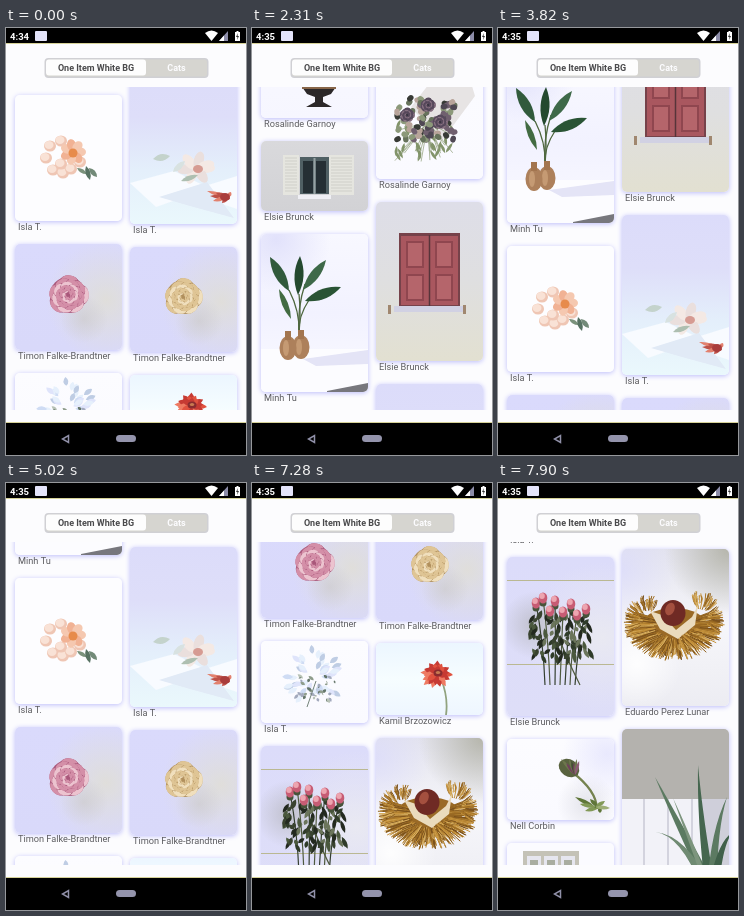
Animation of 240 by 427 pixels, one loop 8000 ms. Source, as an HTML page with a canvas:

```html
<!DOCTYPE html>
<html lang="en">
<head>
<meta charset="utf-8">
<title>Photo list</title>
<style>
  html, body { margin: 0; width: 100%; height: 100%; overflow: hidden; background: #fcfcfe; }
  canvas { display: block; width: 240px; height: 427px; }
</style>
</head>
<body>
<canvas id="stage" width="240" height="427"></canvas>
<script>
const LOOP = 8000, STRIP_TOP = -420, VIEW_TOP = 59, VIEW_H = 323, CARD_W = 107;
const PAGE = '#fcfcfe', LAVENDER = '#dcdcfa';
const stage = document.getElementById('stage').getContext('2d');

const stripCanvas = document.createElement('canvas');
stripCanvas.width = 240;
stripCanvas.height = 1260;
const g = stripCanvas.getContext('2d');

let seed = 7;
const random = () => (seed = (seed * 16807) % 2147483647) / 2147483647;
const spread = (mid, range) => mid + (random() - 0.5) * range;
const pick = list => list[Math.floor(random() * list.length)];

// Drawing helpers, in coordinates local to a card

function rect(x, y, w, h, color) {
  g.fillStyle = color;
  g.fillRect(x, y, w, h);
}

function oval(x, y, rx, ry, color, angle = 0) {
  g.fillStyle = color;
  g.beginPath();
  g.ellipse(x, y, rx, ry, angle, 0, 7);
  g.fill();
}

function poly(color, ...points) {
  g.fillStyle = color;
  g.beginPath();
  for (let i = 0; i < points.length; i += 2) g.lineTo(points[i], points[i + 1]);
  g.fill();
}

function line(x1, y1, x2, y2, color, width = 1, bend = 0) {
  g.strokeStyle = color;
  g.lineWidth = width;
  g.beginPath();
  g.moveTo(x1, y1);
  g.quadraticCurveTo((x1 + x2) / 2 + bend, (y1 + y2) / 2, x2, y2);
  g.stroke();
}

function leaf(x1, y1, x2, y2, width, color) {
  const length = Math.hypot(x2 - x1, y2 - y1);
  const nx = (y1 - y2) / length * width, ny = (x2 - x1) / length * width;
  const mx = (x1 + x2) / 2, my = (y1 + y2) / 2;
  g.fillStyle = color;
  g.beginPath();
  g.moveTo(x1, y1);
  g.quadraticCurveTo(mx + nx, my + ny, x2, y2);
  g.quadraticCurveTo(mx - nx, my - ny, x1, y1);
  g.fill();
}

function gradient(h, ...colors) {
  const fill = g.createLinearGradient(0, 0, 0, h);
  colors.forEach((color, i) => fill.addColorStop(i / (colors.length - 1), color));
  rect(0, 0, CARD_W, h, fill);
}

function glow(x, y, r, rgb, alpha) {
  const fill = g.createRadialGradient(x, y, 0, x, y, r);
  fill.addColorStop(0, `rgba(${rgb},${alpha})`);
  fill.addColorStop(1, `rgba(${rgb},0)`);
  rect(x - r, y - r, r * 2, r * 2, fill);
}

function rose(x, y, r, [shade, petal, light]) {
  const count = 36;
  oval(x, y, r * 0.9, r * 0.9, shade);
  for (let i = 0; i < count; i++) {
    const a = i * 2.4, reach = r * (1 - i / count), size = r * 0.12 + reach * 0.3;
    const px = x + Math.cos(a) * reach * 0.72, py = y + Math.sin(a) * reach * 0.72;
    oval(px, py, size * 0.75, size * 1.15, shade, a);
    oval(px + Math.cos(a), py + Math.sin(a), size * 0.65, size, i % 3 ? petal : light, a);
  }
  oval(x, y, r * 0.1, r * 0.1, shade);
}

// Pictures

function urn() {
  gradient(160, '#fcfcff', '#f6f6ff');
  for (let i = 0; i < 60; i++) {
    oval(spread(58, 64), spread(99, 42), 4, 3,
      pick(['#495647', '#71806a', '#d9c3cb', '#f0dfe0', '#9c6f86']), random() * 3);
  }
  poly('#2c2829', 39, 126, 77, 126, 70, 136, 62, 139, 62, 144, 71, 149, 45, 149, 54, 144, 54, 139, 46, 136);
  line(41, 130, 75, 130, '#886649', 2);
}

function windowFacade() {
  gradient(70, '#d9d9dc', '#d2d2d5');
  for (const [x, w] of [[22, 16], [68, 25]]) {
    rect(x, 14, w, 40, '#e5e5df');
    for (let y = 17; y < 53; y += 3) line(x + 2, y, x + w - 2, y, '#c6c6c0', 0.7);
  }
  rect(39, 16, 29, 37, '#506064');
  rect(42, 20, 10, 32, '#252f34');
  rect(55, 20, 10, 32, '#252f34');
  line(53.5, 17, 53.5, 53, '#96a1a3', 2);
  rect(37, 54, 33, 4, '#efeff4');
}

function pottedLeaves() {
  gradient(158, '#f8f8ff', '#f2f2ff', '#fafaff');
  glow(15, 5, 55, '220,220,250', 0.8);
  rect(0, 115, CARD_W, 43, '#fcfcff');
  poly('#e4e4f6', 42, 125, 107, 116, 107, 130, 55, 132);
  poly('#77777d', 66, 157, 107, 149, 107, 158, 66, 158);
  for (const [x, y, bend] of [[28, 56, 6], [38, 60, 2], [44, 50, -5], [48, 66, -6]]) {
    line(38, 99, x, y, '#4f6840', 1.3, bend);
  }
  leaf(28, 57, 9, 23, 10, '#315a3c');
  leaf(37, 61, 39, 22, 9, '#24492f');
  leaf(42, 56, 65, 26, 9, '#3e6949');
  leaf(44, 67, 80, 53, 10, '#2a5435');
  leaf(30, 85, 18, 55, 6, '#426b42');
  for (const [x, y] of [[40, 110], [27, 111]]) {
    oval(x, y + 3, 8.5, 12, '#ad805b');
    rect(x - 3, y - 14, 6, 9, '#a3754f');
    oval(x - 2, y + 3, 3, 8, '#c59a73');
  }
}

function peachFlowers() {
  rect(0, 0, CARD_W, 126, '#fdfdff');
  for (const [x, y] of [[35, 51], [46, 46], [31, 63], [38, 75], [48, 78], [56, 74], [46, 69], [65, 67]]) {
    oval(x, y, 6, 5.5, '#efc6b4');
    oval(x - 1, y - 1, 4.5, 4, '#f9e2d6');
  }
  for (let i = 0; i < 7; i++) {
    const a = i * 0.9;
    oval(58 + Math.cos(a) * 7, 57 + Math.sin(a) * 7, 6, 4.5, i % 2 ? '#f1b294' : '#f5c8b0', a);
  }
  oval(58, 58, 4.5, 4.5, '#e78b4b');
  leaf(62, 73, 72, 79, 4, '#7b927c');
  leaf(71, 71, 75, 85, 5, '#577262');
  leaf(74, 73, 82, 82, 5, '#728a78');
}

function roseHead(x, y, r, colors) {
  gradient(106, '#dadafc', '#d9d9fa');
  glow(x + 38, y + 5, 60, '226,224,205', 0.7);
  glow(x + 16, y + 24, 24, '196,194,190', 0.45);
  rose(x, y, r, colors);
}

function paleSprig() {
  gradient(82, '#fcfcff', '#fafaff');
  for (let i = 0; i < 42; i++) {
    const a = random() * 2 * Math.PI, reach = 6 + random() * 18;
    const x = 53 + Math.cos(a) * reach, y = 36 + Math.sin(a) * reach;
    leaf(x, y, x + Math.cos(a) * 11, y + Math.sin(a) * 9, 5, pick(['#dfe4fb', '#cfdcf4', '#e6f0fc', '#bfcde4']));
  }
  for (let i = 0; i < 34; i++) {
    const x = spread(53, 40), y = spread(49, 26);
    leaf(x, y, x + spread(0, 12), y + spread(0, 10), 3, pick(['#65766a', '#8f9d8c', '#b8c2b6', '#a3aabd']));
  }
  line(46, 66, 55, 40, '#74847a');
}

function roseBunch() {
  gradient(159, LAVENDER, '#dedef8');
  glow(95, 80, 75, '236,236,240', 0.8);
  glow(28, 68, 34, '180,180,186', 0.7);
  for (const y of [23, 107]) line(0, y + 0.5, CARD_W, y + 0.5, '#bab892', 1);
  const heads = [[29, 46], [36, 41], [48, 44], [56, 55], [64, 47], [70, 58], [79, 52], [43, 54]];
  heads.forEach(([x, y], i) => line(x, y, 38 + i * 5, 128, i % 2 ? '#4f5a3f' : '#343f30', 1.2, 3 - i));
  for (let i = 0; i < 95; i++) {
    const x = spread(53, 60), y = spread(76, 46);
    leaf(x, y, x + spread(0, 13), y + 4 + random() * 9, 4, pick(['#2f3b29', '#4a583d', '#6b755b', '#23291f', '#39432f']));
  }
  for (const [x, y] of heads) {
    oval(x, y + 5, 3.5, 3.5, '#46533a');
    oval(x, y, 4.3, 5.5, '#c75c74');
    oval(x - 1, y - 2, 2.8, 3, '#eda5b0');
  }
}

function bud() {
  gradient(81, '#fcfcff', '#fafaff');
  glow(100, 15, 45, '220,220,252', 0.6);
  glow(80, 65, 30, '205,205,215', 0.5);
  line(65, 33, 90, 70, '#74824e', 2.2, 12);
  oval(62, 29, 11, 8.5, '#59633f', 0.6);
  for (let i = 0; i < 8; i++) {
    leaf(68, 36, 54 + i * 2.6, 20 + (i % 3) * 2, 3, pick(['#70405c', '#8d5c75', '#6d774d', '#454d35']));
  }
  for (let i = 0; i < 8; i++) {
    leaf(spread(90, 6), 68, 68 + i * 5, 58 + (i * 7) % 19, 4, pick(['#5f7639', '#829957', '#9dae75']));
  }
}

function paneBox() {
  rect(0, 0, CARD_W, 100, '#fbfbff');
  rect(16, 8, 56, 92, '#c4c2b7');
  for (let x = 20; x < 70; x += 17) {
    rect(x, 13, 14, 40, '#e6e6ef');
    rect(x + 3, 17, 8, 22, '#a9ada0');
  }
}

function bouquet() {
  gradient(187, '#fcfcff', '#fafaff');
  poly('#e7e4e4', 35, 115, 60, 83, 93, 84, 99, 104, 65, 150);
  for (let i = 0; i < 24; i++) {
    const x = spread(51, 66), y = spread(143, 34);
    line(52, 130, x, y + 10, '#9aa887', 0.8);
    leaf(x, y, x + spread(0, 14), y + 10, 3, '#82946a');
  }
  for (let i = 0; i < 75; i++) {
    oval(spread(50, 58), spread(127, 42), 3.5, 2.8,
      pick(['#4f4854', '#70606f', '#67735c', '#8c997a', '#b8a49a', '#383b36']), random() * 3);
  }
  for (const [x, y] of [[31, 123], [52, 113], [64, 130]]) rose(x, y, 7, ['#393440', '#584a5d', '#877080']);
}

function redShutters() {
  gradient(159, '#dedee8', '#dfdfe0', '#e2e0d1');
  rect(23, 31, 61, 73, '#76424a');
  for (const x of [25, 54]) {
    rect(x, 34, 28, 69, '#a9575f');
    for (const y of [39, 72]) {
      rect(x + 5, y, 18, 27, '#8f464f');
      rect(x + 7, y + 2, 14, 23, '#b5656b');
    }
  }
  line(53.5, 33, 53.5, 104, '#57343a', 1.5);
  rect(18, 104, 71, 6, '#d1d1e3');
  rect(12, 103, 3, 9, '#a0876f');
  rect(87, 103, 3, 9, '#a0876f');
}

function bathFlowers() {
  gradient(160, LAVENDER, '#dedef9', '#e4effb', '#eaf8fc');
  poly('#f8fbff', 0, 119, 44, 107, 75, 122, 107, 112, 107, 145, 63, 130, 26, 143);
  poly('#e1eaf6', 29, 133, 77, 118, 104, 154, 60, 142);
  for (let i = 0; i < 7; i++) oval(66 + Math.cos(i) * 10, 104 + Math.sin(i) * 8, 9, 5, i % 2 ? '#eadfdd' : '#f4e9e4', i);
  oval(68, 105, 5, 4, '#d69b92');
  leaf(23, 95, 40, 92, 7, '#c4d3cc');
  leaf(51, 117, 68, 111, 5, '#aebfb1');
  leaf(43, 108, 55, 97, 6, '#d8e2e1');
  for (let i = 0; i < 9; i++) leaf(98, 133, 77 + i * 3, 127 + (i * 5) % 13, 4, i % 2 ? '#bd5148' : '#e2816e');
  oval(95, 133, 5, 4, '#a93d3c');
}

function gerbera() {
  gradient(72, '#ecf6ff', '#f6fdff', '#eef6ff');
  line(65, 36, 70, 72, '#91a37f', 1.8, 5);
  for (let i = 0; i < 24; i++) {
    const a = i * 2.4, reach = 1 - i / 60;
    leaf(61, 30, 60 + Math.cos(a) * 17 * reach, 32 + Math.sin(a) * 15 * reach, 6, pick(['#c63a33', '#e0523f', '#ee7a62']));
  }
  oval(62, 30, 4.5, 3.5, '#8a2c2f');
  oval(62, 29.5, 2.2, 1.6, '#c77a50');
}

function spikes(x, y, rx, ry, count, from, to) {
  for (let i = 0; i < count; i++) {
    const a = from + random() * (to - from), inner = 0.35 + random() * 0.35, outer = 0.85 + random() * 0.25;
    line(x + Math.cos(a) * rx * inner, y + Math.sin(a) * ry * inner,
      x + Math.cos(a) * rx * outer, y + Math.sin(a) * ry * outer,
      pick(['#a87628', '#c6933c', '#7a511d', '#d9b060', '#92631f']), 1, spread(0, 6));
  }
}

function chestnut() {
  gradient(157, '#e4e4ee', '#f6f6fa', '#ececf2');
  glow(107, 0, 65, '176,176,164', 0.9);
  glow(0, 20, 55, '218,218,252', 0.7);
  glow(15, 115, 45, '255,255,255', 0.9);
  oval(52, 79, 34, 20, '#9a6a26');
  spikes(52, 76, 46, 33, 330, -0.45, Math.PI + 0.45);
  spikes(26, 72, 22, 24, 70, 2.6, 5.2);
  spikes(78, 70, 22, 26, 70, -2, 0.6);
  poly('#eadbbd', 28, 62, 40, 66, 54, 81, 70, 68, 76, 56, 73, 76, 56, 90, 38, 80);
  oval(51, 64, 12.5, 13, '#6f2a24');
  oval(48, 60, 4.5, 6.5, '#a4503f', 0.4);
  spikes(52, 80, 32, 24, 60, 0.3, 2.8);
}

function blade(x, y, cx, cy, baseX, width, color) {
  g.fillStyle = color;
  g.beginPath();
  g.moveTo(baseX - width, 158);
  g.quadraticCurveTo(cx - width * 0.6, cy, x, y);
  g.quadraticCurveTo(cx + width * 0.6, cy, baseX + width, 158);
  g.fill();
}

function aloe() {
  rect(0, 0, CARD_W, 200, '#b4b2ae');
  rect(0, 70, 80, 130, '#f2f2f8');
  rect(80, 70, 27, 130, '#cfcfda');
  for (const x of [22, 46, 70]) line(x, 70, x, 200, '#c9c9d6', 1.5);
  blade(33, 48, 55, 92, 88, 6, '#5b7a61');
  blade(76, 36, 78, 90, 88, 5, '#45664f');
  blade(105, 68, 92, 100, 90, 5, '#5c7a62');
  blade(33, 103, 62, 106, 84, 5, '#6f8a72');
  blade(51, 69, 64, 100, 86, 3, '#7d957e');
  blade(112, 102, 98, 112, 92, 5, '#40604a');
}

// List

function column(x, top, cards) {
  for (const [h, name, picture] of cards) {
    g.save();
    g.shadowColor = '#bcbcfa';
    g.shadowBlur = 5;
    g.shadowOffsetY = 1;
    g.fillStyle = '#fdfdff';
    g.beginPath();
    g.roundRect(x, top, CARD_W, h, 5);
    g.fill();
    g.shadowColor = 'transparent';
    g.clip();
    g.translate(x, top);
    picture();
    g.restore();
    g.fillStyle = '#5c5c60';
    g.fillText(name, x + 3, top + h + 9);
    top += h + 23;
  }
}

rect(0, 0, 240, 1260, PAGE);
g.translate(0, -STRIP_TOP);
g.font = '9.2px Roboto, sans-serif';
column(9, -390, [
  [160, 'Rosalinde Garnoy', urn],
  [70, 'Elsie Brunck', windowFacade],
  [158, 'Minh Tu', pottedLeaves],
  [126, 'Isla T.', peachFlowers],
  [106, 'Timon Falke-Brandtner', () => roseHead(53, 51, 20, ['#a8577a', '#d48fa8', '#ecc3cf'])],
  [82, 'Isla T.', paleSprig],
  [159, 'Elsie Brunck', roseBunch],
  [81, 'Nell Corbin', bud],
  [100, '', paneBox]
]);
column(124, -356, [
  [187, 'Rosalinde Garnoy', bouquet],
  [159, 'Elsie Brunck', redShutters],
  [160, 'Isla T.', bathFlowers],
  [105, 'Timon Falke-Brandtner', () => roseHead(53, 50, 19, ['#b08f5c', '#dfc595', '#f0dfbd'])],
  [72, 'Kamil Brzozowicz', gerbera],
  [157, 'Eduardo Perez Lunar', chestnut],
  [200, '', aloe]
]);

// Motion

const swipes = [
  { start: 2100, end: 2630, steps: 12, from: -411, to: -229 },
  { start: 3700, end: 4110, steps: 11, from: -229, to: -34 },
  { start: 5020, end: 5470, steps: 11, from: -34, to: 184 },
  { start: 7280, end: 7900, steps: 13, from: 184, to: 376 }
];
const swipeEase = p => 1 - (1 - p ** 2.1) ** 4;

function scrollAt(t) {
  let scroll = swipes[0].from;
  for (const { start, end, steps, from, to } of swipes) {
    if (t < start) break;
    const step = Math.floor((t - start) / (end - start) * (steps - 1) + 0.1) + 1;
    scroll = from + (to - from) * swipeEase(Math.min(1, step / steps));
  }
  return Math.round(scroll);
}

function text(value, x, y, font, color, align = 'left') {
  stage.font = font + ' Roboto, sans-serif';
  stage.fillStyle = color;
  stage.textAlign = align;
  stage.fillText(value, x, y);
}

function box(x, y, w, h, color, radius = 0) {
  stage.fillStyle = color;
  stage.beginPath();
  stage.roundRect(x, y, w, h, radius);
  stage.fill();
}

function shape(path, color) {
  stage.fillStyle = color;
  stage.fill(new Path2D(path));
}

function drawChrome() {
  box(0, 0, 240, 427, PAGE);
  box(0, 0, 240, 15, '#000');
  box(0, 15, 240, 1, '#d6d298');
  box(29, 3, 12, 10, '#e4e4fa', 1);
  shape('M199 5Q205.500 0 212 5L205.500 13Z', '#fff');
  shape('M222 3V13H213Z', '#8c8ca8');
  shape('M218 7.500V13H213Z', '#fff');
  shape('M229 4H230.500V3H232.500V4H234V13H229Z', '#fff');
  shape('M232 5L230 9H231.500L231 12L233 8H231.500Z', '#333');

  box(38.500, 30, 164, 20, '#d0d0d4', 4);
  box(40, 31.500, 161, 17, '#d6d5d0', 3);
  box(40, 31.500, 100, 16, '#fdfdfd', 3);
  text('One Item White BG', 90, 42.500, '700 9px', '#4a4a4c', 'center');
  text('Cats', 170.500, 43, '700 9px', '#fcfcfe', 'center');

  box(0, 394, 240, 1, '#d6d298');
  box(0, 395, 240, 32, '#000');
  stage.strokeStyle = '#9090a8';
  stage.lineWidth = 1.5;
  stage.stroke(new Path2D('M62.500 407.500V414.500L56.500 411Z'));
  box(110, 407, 20, 7, '#9494ac', 3.5);
}

function drawScene(scroll, clock, alpha) {
  stage.globalAlpha = alpha;
  stage.drawImage(stripCanvas, 0, scroll + VIEW_TOP - STRIP_TOP, 240, VIEW_H, 0, VIEW_TOP, 240, VIEW_H);
  box(0, 0, 27, 15, '#000');
  text(clock, 4, 12, '700 9.5px', '#fff');
  stage.globalAlpha = 1;
}

function frame() {
  const t = performance.now() % LOOP;
  const fade = t < 50 ? 0 : Math.min(1, t / 1680);
  drawChrome();
  if (fade < 1) drawScene(0, '4:34', 1);
  if (fade > 0) drawScene(scrollAt(t), '4:35', fade);
  requestAnimationFrame(frame);
}
frame();
</script>
</body>
</html>
```
